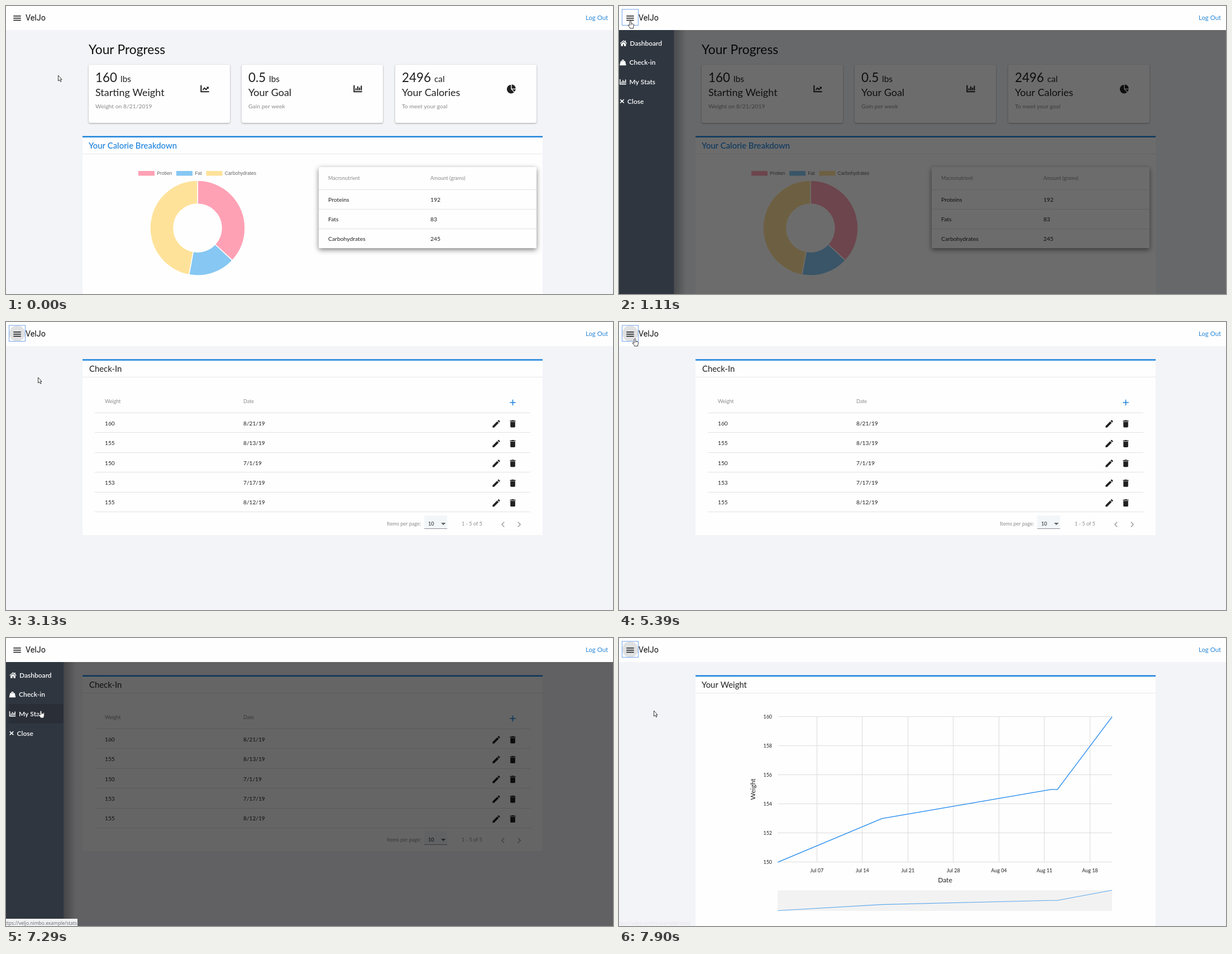
An HTML page with a canvas for the animation above (7.99 s loop, 1087x515 px).

```html
<!DOCTYPE html>
<html lang="en">
<head>
<meta charset="utf-8">
<title>Fitness tracker</title>
<style>
html, body { margin: 0; width: 100%; height: 100%; overflow: hidden; background: #f3f4f8; }
canvas { display: block; }
</style>
</head>
<body>
<canvas id="stage" width="1087" height="515"></canvas>
<script>
const W = 1087, H = 515, LOOP = 7990, HEADER = 43, SIDEBAR = 103;
const ctx = document.getElementById('stage').getContext('2d');
const BLUE = '#1a82dc', INK = '#212121', GREY = '#8b8b8d', RULE = '#e2e2e3';

// Icons on a 24 unit grid
const icons = {
  menu: 'M3 18h18v-2H3zM3 13h18v-2H3zM3 6v2h18V6z',
  plus: 'M19 13h-6v6h-2v-6H5v-2h6V5h2v6h6z',
  pencil: 'M3 17.25V21h3.75L17.81 9.94l-3.75-3.75zM20.71 7.04c.39-.39.39-1.02 0-1.41l-2.34-2.34c-.39-.39-1.02-.39-1.41 0l-1.83 1.83 3.75 3.75z',
  trash: 'M6 19c0 1.1.9 2 2 2h8c1.1 0 2-.9 2-2V7H6zM19 4h-3.5l-1-1h-5l-1 1H5v2h14z',
  left: 'M15.41 7.41L14 6l-6 6 6 6 1.41-1.41L10.83 12z',
  right: 'M10 6L8.59 7.41 13.17 12l-4.58 4.59L10 18l6-6z',
  trend: 'M1 3h3v15h19v3H1zM6 14l5-6 4 4 3-3-2-2h6v6l-2-2-5 5-4-4-3 4z',
  bars: 'M1 3h3v15h19v3H1zM6 11h3v5H6zM10.5 6h3v10h-3zM15 9h3v7h-3zM19.5 4h3v12h-3z',
  pie: 'M11 2v11l8 8A11 11 0 1 1 11 2zM13 1a10.500 10.500 0 0 1 10 10.500H13zM14 13.500h9a10 10 0 0 1-3 6z',
  home: 'M12 2L0 12l1.500 2L12 5.500 22.500 14l1.500-2-4-3.500V3h-3v3zM12 7.500L3.500 14.500V22H10v-6h4v6h6.500v-7.500z',
  weight: 'M8 7a4.200 4.200 0 1 1 8 0h4l3 14-1 1H2l-1-1L4 7zM10 7h4a2 2 0 1 0-4 0z',
  close: 'M5 3L3 6l6 6-6 6 2 3 7-6 7 6 2-3-6-6 6-6-2-3-7 6z'
};
for (const name in icons) icons[name] = new Path2D(icons[name]);

const arrowCursor = new Path2D('M0 0V10L2.300 8 4 11.500 5.500 10.800 4 7.400H6.500z');
const handCursor = new Path2D('M-1.400 8V.9Q0-.8 1.400 .9V4.600L5 5.300Q6.300 5.700 6.200 7L5.300 10.500V13H-1V11.500L-4.300 8Q-4.200 6.400-2.800 7z');

// [first change, last change, number of screen updates]
const bursts = [[160, 950, 11], [1020, 1800, 11], [1880, 2430, 8], [2660, 3130, 7],
  [4450, 5220, 11], [5310, 6100, 11], [6180, 6790, 9], [6940, 7680, 10], [7820, 7900, 2]];

// Pointer path: [time, x, y]
const pointerPath = [[80, 93, 124], [950, 20, 27], [1110, 20, 27], [1800, 45, 68], [2430, 57, 99],
  [4370, 57, 99], [4900, 21, 18], [5220, 25, 27], [5390, 28, 30], [5600, 28, 30],
  [6100, 12, 92], [6790, 62, 130]];

const menuItems = [['home', 'Dashboard', 24], ['weight', 'Check-in', 23], ['bars', 'My Stats', 23], ['close', 'Close', 19.5]];

const clamp = v => Math.max(0, Math.min(1, v));
const between = (t, a, b) => t >= a && t < b;

function snapTime(t) {
  let snapped = 0;
  for (const [start, end, count] of bursts) {
    if (t < start) break;
    const step = (end - start) / (count - 1);
    snapped = Math.min(end, start + Math.floor((t - start) / step + 0.001) * step);
  }
  return snapped;
}

// cubic-bezier(.25, .8, .25, 1)
function swift(x) {
  x = clamp(x);
  let lo = 0, hi = 1;
  for (let i = 0; i < 20; i++) {
    const s = (lo + hi) / 2;
    if (0.75 * s * (1 - s) + s ** 3 < x) lo = s; else hi = s;
  }
  return 2.4 * lo * (1 - lo) ** 2 + 3 * lo * lo * (1 - lo) + lo ** 3;
}

function sidebarAmount(t) {
  if (between(t, 1015, 2640)) return swift((t - 873) / 400);
  if (between(t, 2640, 5000)) return 1 - swift((t - 2640) / 400);
  if (between(t, 5399, 7270)) return swift((t - 5399) / 400);
  if (t >= 7270) return 1 - swift((t - 7270) / 400);
  return 0;
}

function pointerAt(t) {
  let prev = pointerPath[0];
  for (const next of pointerPath) {
    if (t < next[0]) {
      const k = clamp((t - prev[0]) / (next[0] - prev[0]));
      const e = k * k * (3 - 2 * k);
      return [prev[1] + (next[1] - prev[1]) * e, prev[2] + (next[2] - prev[2]) * e];
    }
    prev = next;
  }
  return prev.slice(1);
}

function rect(x, y, w, h, fill) {
  ctx.fillStyle = fill;
  ctx.fillRect(x, y, w, h);
}

function text(str, x, y, size, color = INK, { weight = 400, align = 'left', family = 'Lato, sans-serif' } = {}) {
  ctx.font = `${weight} ${size}px ${family}`;
  ctx.textAlign = align;
  ctx.fillStyle = color;
  ctx.fillText(str, x, y);
}

function icon(name, cx, cy, scale, color = INK) {
  ctx.save();
  ctx.translate(cx, cy);
  ctx.scale(scale, scale);
  ctx.translate(-12, -12);
  ctx.fillStyle = color;
  ctx.fill(icons[name], 'evenodd');
  ctx.restore();
}

function shadowCard(x, y, w, h, radius, blur, offset, alpha) {
  ctx.save();
  ctx.shadowColor = `rgba(0,0,0,${alpha})`;
  ctx.shadowBlur = blur;
  ctx.shadowOffsetY = offset;
  ctx.fillStyle = '#fefefe';
  ctx.beginPath();
  ctx.roundRect(x, y, w, h, radius);
  ctx.fill();
  ctx.restore();
}

function polyline(points, color, width) {
  ctx.beginPath();
  points.forEach(([x, y]) => ctx.lineTo(x, y));
  ctx.strokeStyle = color;
  ctx.lineWidth = width;
  ctx.stroke();
}

function panel(y, bottom, title, x, color = INK, weight = 400) {
  rect(137, y, 824, bottom - y, '#fefefe');
  rect(137, y, 824, 2.5, BLUE);
  rect(137, y + 31.5, 824, 1, '#e8e8ea');
  text(title, x, y + 22.5, 14.9, color, { weight });
}

function progressCard(x, value, unit, unitX, label, note, name) {
  shadowCard(x, 105, 253, 104, 3, 3, 1, 0.35);
  text(value, x + 12, 136, 22.4);
  text(unit, x + unitX, 136, 15.4);
  text(label, x + 12, 161, 18);
  text(note, x + 12, 183, 10.4, GREY);
  icon(name, x + 208, 148, 0.7);
}

function donut(cx, cy, outer, inner, slices) {
  const total = slices.reduce((sum, s) => sum + s[0], 0);
  let from = -Math.PI / 2;
  for (const [amount, color] of slices) {
    const to = from + amount / total * 2 * Math.PI;
    ctx.beginPath();
    ctx.arc(cx, cy, outer, from, to);
    ctx.arc(cx, cy, inner, to, from, true);
    ctx.closePath();
    ctx.fillStyle = color;
    ctx.fill();
    ctx.strokeStyle = '#fff';
    ctx.lineWidth = 1.5;
    ctx.stroke();
    from = to;
  }
}

function dashboardPage() {
  text('Your Progress', 148, 86, 22.8, '#111');
  progressCard(148, '160', 'lbs', 57, 'Starting Weight', 'Weight on 8/21/2019', 'trend');
  progressCard(422, '0.5', 'lbs', 49, 'Your Goal', 'Gain per week', 'bars');
  progressCard(697, '2496', 'cal', 70, 'Your Calories', 'To meet your goal', 'pie');
  panel(232.5, H, 'Your Calorie Breakdown', 148, BLUE, 500);

  const pink = '#ffa1b5', sky = '#86c7f3', yellow = '#ffe29a';
  const legend = [['Protien', 237, pink], ['Fat', 305, sky], ['Carbohydrates', 358.5, yellow]];
  for (const [name, x, color] of legend) {
    rect(x, 295, 29, 8.5, color);
    text(name, x + 33.3, 302, 8.6, '#666', { family: 'Liberation Sans, Arial, sans-serif' });
  }
  donut(343, 397, 85, 43, [[192, pink], [83, sky], [245, yellow]]);

  shadowCard(560, 288, 390, 145, 2, 10, 3, 0.5);
  text('Macronutrient', 577, 311, 9, GREY);
  text('Amount (grams)', 760, 311, 9, GREY);
  [['Proteins', 192], ['Fats', 83], ['Carbohydrates', 245]].forEach(([name, grams], i) => {
    const y = 328 + i * 35;
    rect(560, y, 390, 1, RULE);
    text(name, 577, y + 22, 10.4);
    text(grams, 760, y + 22, 10.4);
  });
}

function checkInPage() {
  panel(66.5, 381, 'Check-In', 149);
  text('Weight', 177, 145, 9, GREY);
  text('Date', 425, 145, 9, GREY);
  icon('plus', 907.5, 144, 0.75, BLUE);
  const rows = [[160, '8/21/19'], [155, '8/13/19'], [150, '7/1/19'], [153, '7/17/19'], [155, '8/12/19']];
  rows.forEach(([weight, date], i) => {
    const y = 162 + i * 35.4;
    rect(159, Math.round(y), 780, 1, RULE);
    text(weight, 177, y + 22.8, 10.2);
    text(date, 425, y + 22.8, 10.2);
    icon('pencil', 878, y + 20, 0.74);
    icon('trash', 907.5, y + 20, 0.72);
  });
  rect(159, 339, 780, 1, RULE);
  text('Items per page:', 682, 364, 9.1, GREY);
  rect(749, 346, 41, 23, '#f3f6f9');
  rect(749, 369, 41, 1, '#8f9092');
  text('10', 756, 364, 9.1);
  ctx.fillStyle = '#666';
  ctx.beginPath();
  ctx.moveTo(779, 359);
  ctx.lineTo(787.5, 359);
  ctx.lineTo(783.2, 363.2);
  ctx.fill();
  text('1 - 5 of 5', 816, 364, 9.1, GREY);
  icon('left', 890, 362, 0.82, '#a8a8a8');
  icon('right', 919, 362, 0.82, '#a8a8a8');
}

function statsPage() {
  const x0 = 284.5, x1 = 883, day = 11.643;
  // [days since Jul 1, weight]
  const data = [[0, 150], [16, 153], [42, 155], [43, 155], [51.4, 160]];
  const trace = (bottom, height) => data.map(([d, w]) => [x0 + d * day, bottom - (w - 150) / 10 * height]);

  panel(66.5, H, 'Your Weight', 148);
  for (let w = 150; w <= 160; w += 2) {
    const y = 400.5 - (w - 150) * 26;
    rect(x0, y - 0.5, x1 - x0, 1, '#dcdcdd');
    text(w, 274, y + 3, 8.9, INK, { align: 'right' });
  }
  ['Jul 07', 'Jul 14', 'Jul 21', 'Jul 28', 'Aug 04', 'Aug 11', 'Aug 18'].forEach((label, i) => {
    const x = x0 + (6 + i * 7) * day;
    rect(Math.floor(x), 140, 1, 261, '#dcdcdd');
    text(label, x, 419, 9, INK, { align: 'center' });
  });
  text('Date', 584, 437, 12, INK, { align: 'center' });
  ctx.save();
  ctx.translate(244, 270.5);
  ctx.rotate(-Math.PI / 2);
  text('Weight', 0, 0, 12, INK, { align: 'center' });
  ctx.restore();
  polyline(trace(400.8, 260), '#1a85ee', 1.3);
  rect(284, 451, 599, 37, '#f2f2f2');
  polyline(trace(487.5, 36.5), '#5fa9ee', 1.2);
}

function sidebar(amount, hovered) {
  if (amount <= 0.001) return;
  rect(0, HEADER, W, H - HEADER, `rgba(0,0,0,${0.6 * amount})`);
  ctx.save();
  ctx.translate((amount - 1) * SIDEBAR, 0);
  const shade = ctx.createLinearGradient(SIDEBAR, 0, SIDEBAR + 22, 0);
  shade.addColorStop(0, `rgba(0,0,0,${0.3 * amount})`);
  shade.addColorStop(1, 'rgba(0,0,0,0)');
  rect(SIDEBAR, HEADER, 22, H - HEADER, shade);
  rect(0, HEADER, SIDEBAR, H - HEADER, '#2f3640');
  menuItems.forEach(([name, label, x], i) => {
    const y = 66.5 + i * 34.6;
    if (i === hovered) rect(5, y - 17.5, SIDEBAR - 5, 34.6, '#292e37');
    icon(name, name === 'home' ? 12.5 : name === 'close' ? 10 : 11.5, y, name === 'close' ? 0.42 : 0.52, '#fff');
    text(label, x, y + 4.2, 12, '#fff', { weight: 600 });
  });
  ctx.restore();
}

function header(focused, filled) {
  rect(0, 0, W, HEADER, '#fefefe');
  if (filled) {
    ctx.fillStyle = '#e0e1e2';
    ctx.beginPath();
    ctx.arc(20, 20.5, 14.3, 0, 2 * Math.PI);
    ctx.fill();
  }
  if (focused) {
    ctx.strokeStyle = '#74a5ee';
    ctx.lineWidth = 1;
    ctx.strokeRect(5.5, 6, 29, 28.5);
  }
  icon('menu', 20, 21.7, 0.75, '#111');
  text('VelJo', 35, 25.5, 14.25, '#111', { family: 'Roboto, sans-serif' });
  text('Log Out', 1038, 25, 11.4, '#2b88d8');
}

function statusBar(path, opacity) {
  if (opacity <= 0) return;
  ctx.save();
  ctx.globalAlpha = opacity;
  rect(0, 502, 128, 13, '#f1f2f3');
  text('https://veljo.nimbo.example/' + path, 127, 513, 8.5, '#5f6368', { align: 'right', family: 'Open Sans, sans-serif' });
  ctx.restore();
}

function pointer(x, y, isHand) {
  ctx.save();
  ctx.translate(x + 0.5, y);
  const shape = isHand ? handCursor : arrowCursor;
  ctx.fillStyle = '#fff';
  ctx.fill(shape);
  ctx.strokeStyle = '#222';
  ctx.lineWidth = 0.9;
  ctx.stroke(shape);
  if (isHand) polyline([[1.4, 4.6], [1.4, 7]], '#222', 0.7);
  ctx.restore();
}

function statusOpacity(t) {
  if (between(t, 2180, 3120)) return clamp((3060 - t) / 160);
  if (t < 6940) return 0;
  if (t < 7600) return 1;
  return t < 7820 ? 0.5 : t < 7900 ? 0.3 : 0.12;
}

function draw(time) {
  const t = snapTime(time);
  const amount = sidebarAmount(t);
  const [x, y] = pointerAt(t);
  const hovered = between(t, 2180, 3000) ? 1 : t >= 6940 ? 2 : -1;
  const overButton = x > 5 && x < 35 && y > 5 && y < 35;
  const overMenu = amount > 0.5 && y > 49 && y < 188;

  rect(0, 0, W, H, '#f3f4f8');
  if (t < 2650) dashboardPage();
  else if (t < 7270) checkInPage();
  else statsPage();
  sidebar(amount, hovered);
  const refocused = between(t, 3040, 5790) || t >= 7670;
  header(refocused || between(t, 940, 1290), refocused);
  statusBar(t < 5000 ? 'check-in' : 'stats', statusOpacity(t));
  pointer(x, y, overButton || overMenu);
}

const begin = performance.now();
function tick() {
  draw((performance.now() - begin) % LOOP);
  requestAnimationFrame(tick);
}
tick();
</script>
</body>
</html>
```
